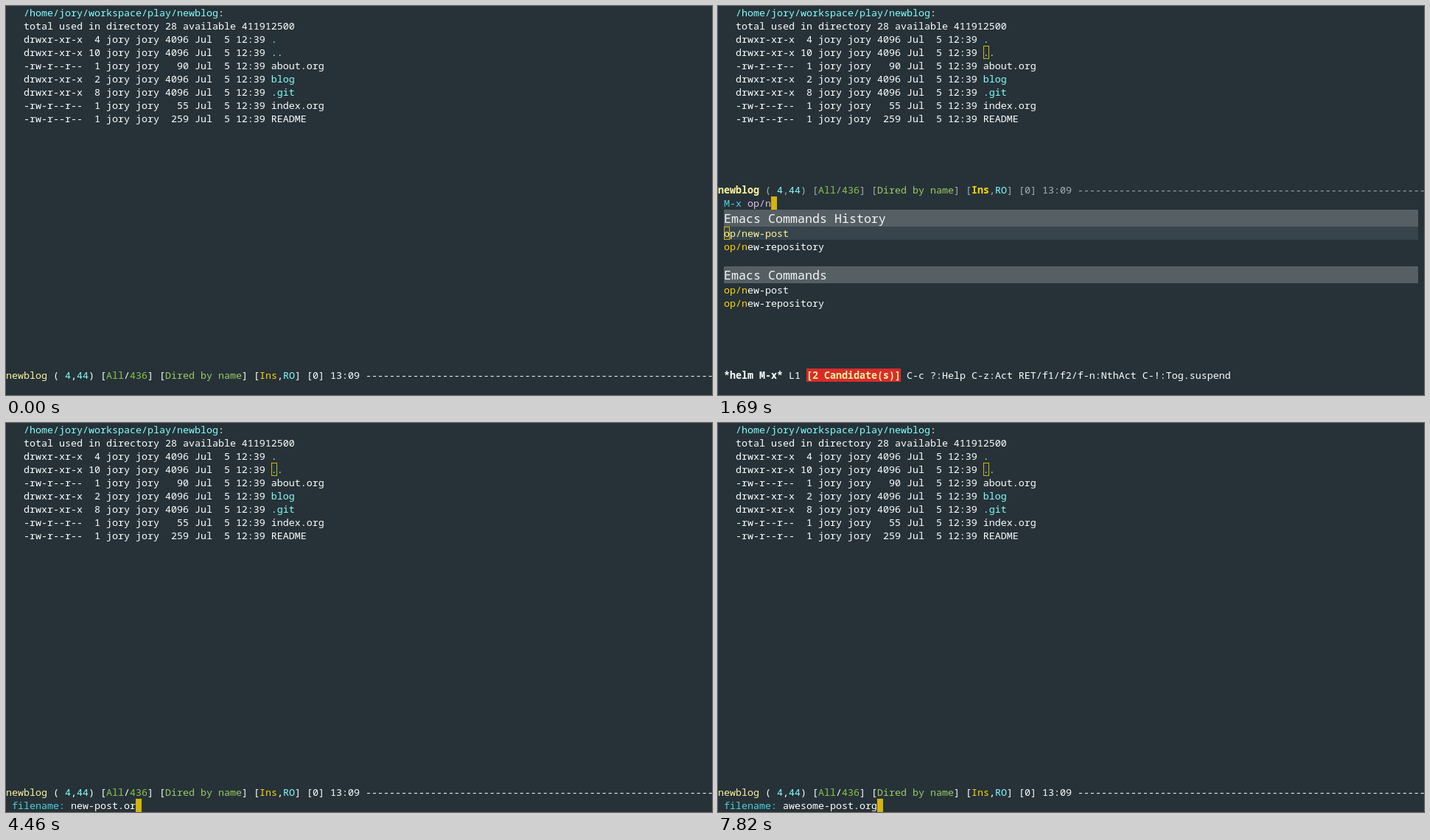
These frames come from a looping animation (958 by 529 pixels, 7990 ms). An HTML page:

```html
<!DOCTYPE html>
<html lang="en">
<head>
<meta charset="utf-8">
<title>New post</title>
<style>
  html, body { margin: 0; width: 100%; height: 100%; overflow: hidden; background: #263238; }
  #stage {
    position: relative; width: 958px; height: 529px; overflow: hidden;
    background: #263238; color: #fff;
    font: 500 13.3333px/18px "Roboto Mono", "Noto Sans Mono", monospace;
    font-variant-ligatures: none; white-space: pre;
  }
  #stage > * { position: absolute; left: 0; width: 958px; margin: 0; font: inherit; overflow: hidden; }
  i { font-style: normal; }
  b { font-weight: 700; }
  .dir { color: #84ffff; }
  .name { color: #fff59d; }
  .green { color: #8bc34a; }
  .mode { color: #9ccc65; }
  .gold { color: #ffd600; }
  .prompt { color: #4dd0e1; }
  .typed { color: #e1bee7; }
  .count { display: inline-block; height: 18px; vertical-align: top; background: #d92b2b; color: #fff59d; font-weight: 700; }
  .cur { display: inline-block; min-width: 8px; height: 18px; vertical-align: top; }
  .fill { background: #d5b40c; color: #263238; }
  .hollow { box-shadow: inset 0 0 0 1px #d5b40c; }
  #files { top: 0; height: 241px; }
  #bar { top: 493px; height: 18px; }
  #mini { top: 511px; height: 18px; }
  #helm { top: 259px; height: 234px; }
  #helmBar { top: 493px; height: 18px; }
  #helm div { height: 18px; margin-left: 8px; width: 942px; }
  #helm .head { height: 23px; background: #555f64; color: #f5f5f5; font-size: 16.6667px; line-height: 23px; }
  #helm .sel { background: #37444b; color: #fff59d; }
  #stage:not(.open) .popup { display: none; }
  .open #bar { top: 241px; color: #a7adba; }
  .open #bar .strong { font-weight: 700; }
</style>
</head>
<body>
<div id="stage">
<pre id="files">   <i class="dir">/home/jory/workspace/play/newblog</i>:
   total used in directory 28 available 411912500
   drwxr-xr-x  4 jory jory 4096 Jul  5 12:39 <i class="dir">.</i>
   drwxr-xr-x 10 jory jory 4096 Jul  5 12:39 <i class="dir"><i class="cur" id="point">.</i>.</i>
   -rw-r--r--  1 jory jory   90 Jul  5 12:39 about.org
   drwxr-xr-x  2 jory jory 4096 Jul  5 12:39 <i class="dir">blog</i>
   drwxr-xr-x  8 jory jory 4096 Jul  5 12:39 <i class="dir">.git</i>
   -rw-r--r--  1 jory jory   55 Jul  5 12:39 index.org
   -rw-r--r--  1 jory jory  259 Jul  5 12:39 README</pre>
<div id="bar"><i class="name strong">newblog</i> ( <i class="dir">4</i>,<i class="dir">44</i>) [<i class="green">All</i>/<i class="green">436</i>] [<i class="mode">Dired by name</i>] [<i class="gold strong">Ins</i>,<i class="dir">RO</i>] [0] 13:09 <i id="dashes"></i></div>
<div id="mini"></div>
<div id="helm" class="popup"></div>
<div id="helmBar" class="popup"> <b>*helm M-x*</b> L1 <i class="count">[<i id="total"></i> Candidate(s)]</i> C-c ?:Help C-z:Act RET/f1/f2/f-n:NthAct C-!:Tog.suspend</div>
</div>
<script>
const $ = id => document.getElementById(id);
const LOOP = 7990;
const HISTORY = ['op/new-post', 'op/new-repository', 'eshell'];
const COMMANDS = [
  'Buffer-menu-delete-backwards', 'Buffer-menu-this-window', 'Info-history-back',
  'Info-validate', 'ad-activate', 'ad-recover',
  'Info-copy-current-node-name', 'Info-top-node', 'add-file-local-variable-prop-line',
  'apropos', 'apropos-command', 'op/do-publication', 'op/insert-options-template',
  'op/new-post', 'op/new-repository'
];
const CURSOR = '<i class="cur fill"></i>';
const steps = [];

const at = (time, view) => steps.push({ time, point: 'hollow', mini: '', ...view });

const ask = (time, label, text, cursor = true) =>
  at(time, { mini: ` <i class="prompt">${label}:</i> ${text}${cursor ? CURSOR : ''}` });

const type = (text, from, times) =>
  times.forEach((t, k) => ask(t, 'filename', text.slice(0, from + k + 1)));

// The list may lag behind the typed text.
const search = (time, typed, filter = typed) => at(time, { helm: { typed, filter } });

const mark = (name, query) =>
  query ? name.replace(query, `<i class="gold">${query}</i>`) : name;

function helmHtml({ typed, filter }) {
  const found = list => list.filter(n => n.includes(filter));
  const row = n => `<div>${mark(n, filter)}</div>`;
  const [first, ...rest] = found(HISTORY);
  return `<div><i class="prompt">M-x</i> <i class="typed">${typed}</i>${CURSOR}</div>` +
    '<div class="head">Emacs Commands History</div>' +
    `<div class="sel"><i class="cur hollow">${first[0]}</i>${first.slice(1)}</div>` +
    rest.map(row).join('') +
    '<div></div><div class="head">Emacs Commands</div>' +
    found(COMMANDS).map(row).join('');
}

at(0, { point: '' });
at(60, { point: 'fill' });
search(520, '');
search(950, 'o', '');
search(1010, 'op', '');
search(1080, 'op');
search(1390, 'op/', 'op');
search(1470, 'op/');
['op/n', 'op/ne', 'op/new'].forEach((text, k) => {
  search(1650 + 80 * k, text, text.slice(0, -1));
  search(1690 + 80 * k, text);
});
at(2260, {});
ask(2300, 'Category', 'blog');
ask(2760, 'Category', 'blog', false);
at(3200, {});
ask(3240, 'filename', 'new-post.org');
ask(3700, 'filename', 'new-post.org', false);
ask(4190, 'filename', 'new-post.org');
ask(4460, 'filename', 'new-post.or');
ask(4960, 'filename', 'new-post.or', false);
for (let k = 0; k < 11; k++) ask(5110 + 40 * k, 'filename', 'new-post.or'.slice(0, 10 - k));
ask(6000, 'filename', '', false);
type('awesome-post.org', 0, [6170, 6260, 6360, 6470, 6550, 6630, 6710, 6790]);
type('awesome-post.org', 8, [7090, 7160, 7235, 7310, 7380]);
type('awesome-post.org', 13, [7590, 7640, 7820]);

function show({ point, mini, helm }) {
  $('point').className = 'cur ' + point;
  $('mini').innerHTML = mini;
  $('stage').classList.toggle('open', !!helm);
  if (!helm) return;
  $('helm').innerHTML = helmHtml(helm);
  $('total').textContent = HISTORY.filter(n => n.includes(helm.filter)).length;
}

let current;
const start = performance.now();
function tick() {
  const t = (performance.now() - start) % LOOP;
  const step = steps.findLast(s => s.time <= t);
  if (step !== current) show(current = step);
  requestAnimationFrame(tick);
}

$('dashes').textContent = '-'.repeat(60);
tick();
</script>
</body>
</html>
```
